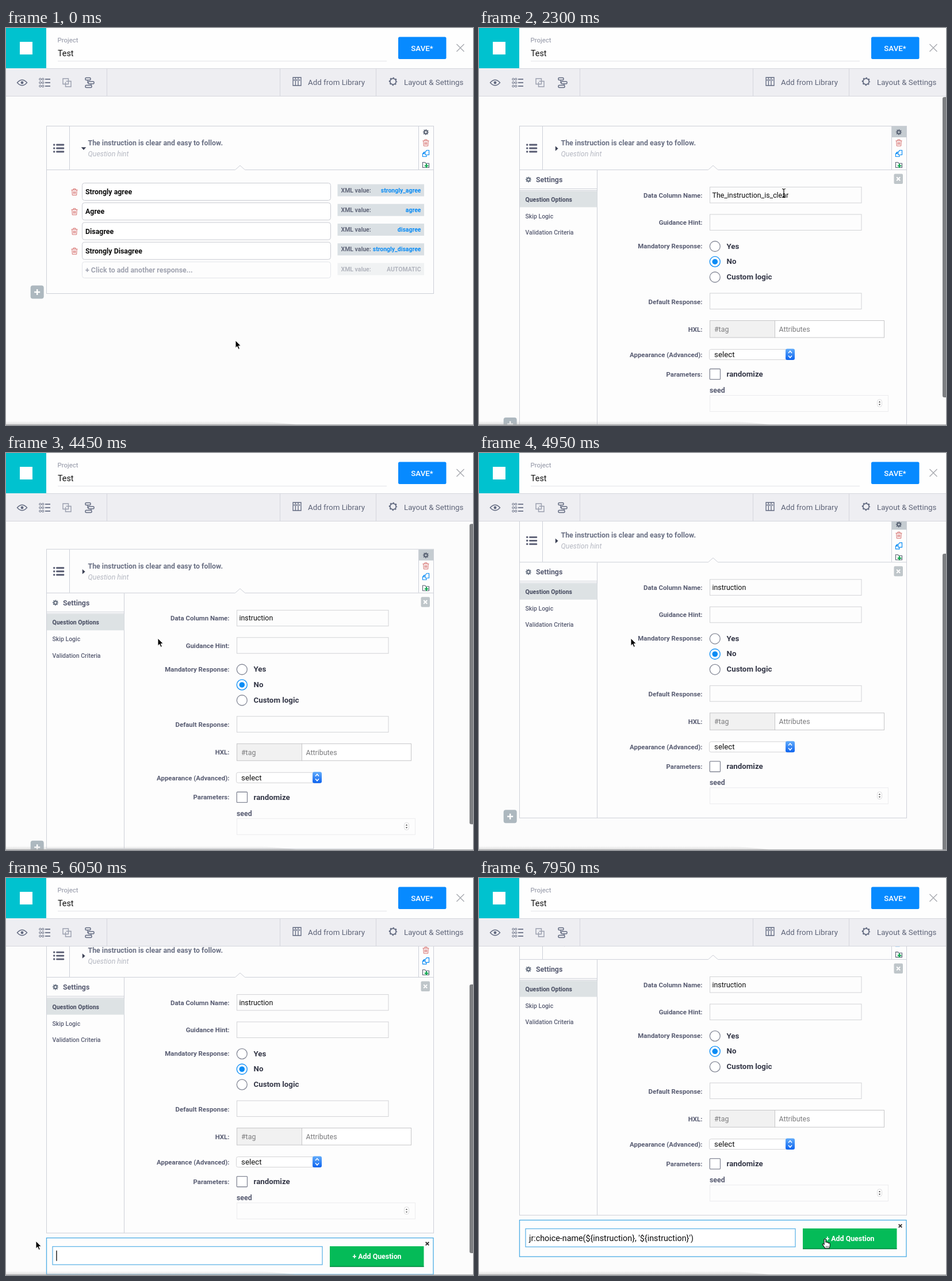
Write an HTML page that moves like this. It is 812x690 px and loops after 8000 ms.

```html
<!DOCTYPE html>
<html lang="en">
<head>
<meta charset="utf-8">
<title>Form builder</title>
<style>
html, body { margin: 0; width: 100%; height: 100%; overflow: hidden; background: #fcfcfc; }
svg { display: block; width: 100%; height: 100%; font-family: Roboto, sans-serif; }
text { white-space: pre; }
</style>
</head>
<body>
<svg id="stage" viewBox="0 0 812 690"></svg>
<script>
const LOOP = 8000;
const INK = '#585c72', LINE = '#cdd0d8', BLUE = '#0a8cf5', RED = '#d6706e';
const F = { xs: 10.48, s: 11.44, m: 12.39, l: 13.34, xl: 14.3 };

// Markup helpers
const text = (x, y, str, size, fill = INK, weight = 400, extra = '') =>
  `<text x="${x}" y="${y}" font-size="${size}" fill="${fill}" font-weight="${weight}" ${extra}>${str}</text>`;
const box = (x, y, w, h, fill, stroke = 'none', rx = 0, extra = '') =>
  `<rect x="${x}" y="${y}" width="${w}" height="${h}" fill="${fill}" stroke="${stroke}" rx="${rx}" ${extra}/>`;
const path = (d, stroke, width = 1, fill = 'none', extra = '') =>
  `<path d="${d}" stroke="${stroke}" stroke-width="${width}" fill="${fill}" ${extra}/>`;
const ring = (x, y, r, stroke, width = 1, fill = 'none', extra = '') =>
  `<circle cx="${x}" cy="${y}" r="${r}" stroke="${stroke}" stroke-width="${width}" fill="${fill}" ${extra}/>`;
const at = (x, y, body, extra = '') => `<g transform="translate(${x} ${y})" ${extra}>${body}</g>`;
const group = (id, body, extra = '') => `<g id="${id}" ${extra}>${body}</g>`;
const END = 'text-anchor="end"', MID = 'text-anchor="middle"';

// Icons, centred on their own origin
const gear = (r, color, width) => {
  const R = r + width * .75, tooth = R * Math.PI / 8;
  return ring(0, 0, r, color, width) +
    ring(0, 0, R, color, width * .9, 'none', `stroke-dasharray="${tooth}" stroke-dashoffset="${tooth / 2}"`);
};
const trash = path('M-5.5 -3.5H5.5M-2 -3.5V-5.5H2V-3.5M-4.2 -3.5L-3.7 5.5H3.7L4.2 -3.5M-1.7 -1.2V3.4M0 -1.2V3.4M1.7 -1.2V3.4', RED, 1);
const copy = path('M-1 -2.5L1.5 -5.5H5.5V2.5H-1ZM-2 -2.5H-3L-5.5 .5V5.5H1V3.2M-5 .5H-2.8V-2', BLUE, 1.2);
const folder = path('M-5.5 4.5V-4.5H-1.5L0 -2.8H5.5V4.5Z', '#596273', 1.1) + path('M1 -2V5M-2.2 1.5H4.4', '#12a651', 2.2);
const cross = (r, color, width) => path(`M${-r} ${-r}L${r} ${r}M${r} ${-r}L${-r} ${r}`, color, width);
const plus = box(-11.5, -11.5, 23, 23, '#adb8bf', 'none', 4) + path('M-5 0H5M0 -5V5', '#fff', 2.4);
const bullets = [-6, 0, 6].map(y =>
  ring(-7.8, y, 1.7, 'none', 0, INK) + box(-4.3, y - 1.4, 14, 2.8, INK, 'none', 1)).join('');

function header() {
  const icon = '#626a80';
  const eye = path('M-8.5 0Q0 -9.5 8.5 0Q0 9.5 -8.5 0Z', icon, 1.4) + ring(0, 0, 2.4, 'none', 0, icon);
  const dots = [-6, 0, 6].map(y => ring(-7.5, y, 1.7, icon, 1) + ring(-2.8, y, 1.7, icon, 1) +
    path(`M1 ${y}H10`, icon, 1.7)).join('');
  const squares = path('M-7 -7H2.5V2.5H-7ZM-1.5 -2.5H7V7H-2.5V-1', '#9a9fae', 1.4);
  const tree = [[-8, -8.5, 9], [-3, -2, 10], [-8, 4.5, 11]].map(([x, y, w]) => box(x, y, w, 4, 'none', icon, 1.5, 'stroke-width="1.5"')).join('') +
    path('M-4 -4.5V0H-3M2 2V4.5', icon, 1.3);
  const books = path('M-7 -7H-2.6V7H-7ZM-2.6 -7H2V7H-2.6ZM2 -7H7V7H2ZM-5 -4V-1M-.5 -4V-1M4.5 -4V-1', icon, 1.3);
  return box(0, 0, 812, 70, '#fefefe') + box(0, 0, 70, 70, '#00c2cf') +
    box(24, 24, 22, 22, '#fff') +
    text(89.5, 24.5, 'Project', F.s, '#8e92a2') + text(90, 49, 'Test', F.xl, '#111') +
    path('M90 57.5H662', '#e3e4e8') +
    box(682, 15.5, 83.5, 38.5, '#078aff', 'none', 2.5) +
    text(723.5, 39.5, 'SAVE*', F.l, '#fff', 500, MID) + at(790, 34.5, cross(6.5, '#a8aab0', 1.4)) +
    box(0, 70, 812, 49, '#eeeef2') +
    path('M70 70.5H812M0 118.5H812M175.5 71V118M476.5 71V118M643.5 71V118', '#d5d6dd') +
    at(28, 95, eye) + at(67, 95, dots) + at(106, 95, squares) + at(146, 95, tree) + at(506, 93, books) +
    text(525, 99, 'Add from Library', F.l, '#5f6579') +
    at(673, 93, gear(5.2, icon, 1.7)) + text(692, 99, 'Layout &amp; Settings', F.l, '#5f6579');
}

function answers() {
  const rows = [['Strongly agree', 'strongly_agree'], ['Agree', 'agree'],
    ['Disagree', 'disagree'], ['Strongly Disagree', 'strongly_disagree']];
  return rows.map(([label, value], i) => at(0, i * 34.25,
    at(119, 285, trash) + box(132.5, 269.5, 432, 30, '#fff', '#c9cbd2', 4) +
    text(138, 289, label, F.m, '#0c0c0c', 700) +
    box(576.5, 271.5, 150.5, 21, '#dae0e4') +
    text(582.5, 285.5, 'XML value:', F.xs, '#62677a', 700) +
    text(721.5, 285.5, value, F.xs, BLUE, 700, END))).join('') +
    box(132.5, 406.5, 432, 28, '#fdfdfd', '#e3e5ea', 4) +
    text(138, 425, '+ Click to add another response...', F.m, '#a0a3b0', 700) +
    box(576.5, 408.5, 150.5, 21, '#f0f2f3') +
    text(582.5, 422.5, 'XML value:', F.xs, '#b2b5be', 700) +
    text(721.5, 422.5, 'AUTOMATIC', F.xs, '#b2b5be', 700, END);
}

function settings() {
  const labels = [['Data Column Name:', 290.5], ['Guidance Hint:', 338], ['Mandatory Response:', 379],
    ['Default Response:', 475.5], ['HXL:', 523.5], ['Appearance (Advanced):', 568], ['Parameters:', 601.5]];
  const radios = [['Yes', 379.5], ['No', 406.2], ['Custom logic', 433]];
  const field = y => box(401.5, y, 263.5, 27.5, '#fdfdfd', '#d2d3d6');
  return path('M205.5 247V691M71 279.5H205M71 282.5H205', LINE) +
    at(86, 263.5, gear(2.7, '#667080', 2)) + text(99, 268, 'Settings', F.m, INK, 700) +
    box(71, 283.5, 134.5, 28, '#dde2e4') +
    text(80.5, 301.5, 'Question Options', F.xs, '#44495e', 700) +
    text(80.5, 330.5, 'Skip Logic', F.xs, INK, 500) + text(80.5, 359, 'Validation Criteria', F.xs, INK, 500) +
    box(721.5, 253.5, 15.5, 17.5, '#bfc6ca', 'none', 2) + at(729.2, 262.3, cross(3, '#fff', 2)) +
    labels.map(([s, y]) => text(388.5, y + 4, s, F.s, INK, 700, END)).join('') +
    field(276.5) + field(324) + field(461) +
    group('focus', box(401, 276, 264.5, 28.5, '#fff', '#6fb5f0', 1, 'stroke-width="2"')) +
    group('selection', box(405.5, 281.5, 133, 18, '#b3d6fd')) +
    text(405.5, 294.7, '', F.m, '#0c0c0c', 400, 'id="column"') +
    group('columnCaret', box(0, 283, 1.3, 15, '#000')) +
    radios.map(([s, y], i) => ring(410.3, y, 9, i == 1 ? BLUE : '#858997', 1.3, '#fff') +
      (i == 1 ? ring(410.3, y, 4.8, 'none', 0, BLUE) : '') + text(430.5, y + 4, s, F.l, '#343747', 700)).join('') +
    box(401.5, 508.5, 113, 29.5, '#f1f1f1', '#c6c6c8') + box(514.5, 508.5, 190, 29.5, '#fff', '#c6c6c8') +
    text(409, 528, '#tag', F.m, '#7c7c7e') + text(521.5, 528, 'Attributes', F.m, '#7c7c7e') +
    box(400.5, 558.5, 147, 18, '#fff', '#d3d3d5', 3) + box(533, 557.5, 16, 19.5, 'url(#cap)', 'none', 3) +
    path('M538 565L541 561.5L544 565M538 569.5L541 573L544 569.5', '#fff', 1.5) +
    text(409, 572, 'select', F.l, '#111') +
    box(401.3, 592.5, 18.2, 18.2, '#fff', '#858997', 1, 'stroke-width="1.3"') +
    text(430.5, 606, 'randomize', F.l, '#343747', 700) + text(401, 634, 'seed', F.m, INK, 700) +
    box(401.5, 638.5, 310, 28, '#fdfdfd', '#ececee') +
    box(692.5, 645.5, 8, 13, '#fff', '#dcdcde', 4) +
    path('M694.8 650.8L696.5 648.6L698.2 650.8ZM694.8 653.6L696.5 655.8L698.2 653.6Z', 'none', 0, '#444');
}

function addRow() {
  return box(70.5, 699.5, 672.5, 63.5, '#fdfdfd', '#4bace5', 0, 'stroke-width="1.3"') +
    box(81, 714.5, 469, 31.5, '#fff', '#62b5e8', 0, 'stroke-width="1.3"') +
    text(87, 735.5, '', F.xl, '#0c0c0c', 400, 'id="newText"') +
    group('newCaret', box(0, 721.5, 1.3, 18, '#000')) +
    box(563, 714, 163.5, 36, '#05bb58') + box(563, 748.5, 163.5, 1.5, '#0a8a45') +
    text(645, 736, '+ Add Question', F.m, '#fff', 700, MID) +
    at(732.5, 709.5, cross(2.8, '#333', 1.9));
}

function card() {
  return `<rect id="frame" x="70.5" y="170.5" width="673" fill="#fdfdfd" stroke="${LINE}"/>` +
    path('M71 246.5H398.5L407 239L415.5 246.5H743M110.5 171V246M717.5 171V246', LINE) +
    text(142.5, 204, 'The instruction is clear and easy to follow.', F.m, '#6a7084', 700) +
    text(142.5, 223, 'Question hint', F.m, '#b5b8c2', 400, 'font-style="italic"') +
    group('gearBack', box(718, 171, 25, 19, '#c5ccd1')) +
    group('overlay', box(71, 171, 672, 76, '#9bafb1', 'none', 0, 'opacity=".93"') +
      path('M110.5 171V246', '#8fa0a5') +
      text(406.7, 214, 'Settings', 21.85, '#565b78', 700, MID)) +
    group('icons', at(91.5, 209, bullets) +
      path('M130.7 207.3H139.3L135 212Z', 'none', 0, '#3c4155', 'id="open"') +
      path('M132.8 205.2V213.8L137.6 209.5Z', 'none', 0, '#3c4155', 'id="closed"') +
      at(730, 181, gear(2.7, '#596273', 2)) + at(730, 199.5, trash) +
      at(730, 218, copy) + at(730, 238, folder)) +
    group('answers', answers()) + group('settings', settings()) +
    `<g id="plus">${plus}</g>` + group('addRow', addRow());
}

const hand = 'M-1.4 1.2C-1.4 -.4 1.4 -.4 1.4 1.2V6C1.7 4.7 4 5 4 6.4C4.5 5.4 6.5 5.8 6.5 7.2C7.1 6.4 8.8 6.8 8.8 8.2V11.2C8.8 13.2 7.6 14.2 7.6 16.2H.2C-.1 14.2 -3.2 11.6 -4.2 9.6C-4.8 8.2 -3.2 7.4 -1.4 9.4Z';
const cursors = group('arrow', path('M0 0V13.2L3 10.4L5.1 15.4L7.4 14.4L5.3 9.6H9.4Z', '#fff', 1, '#000')) +
  group('hand', path(hand, '#111', 1.1, '#fff') + path('M2 12V15M4 12V15M6 12V15', '#333', .8)) +
  group('beam', path('M-3 -7.5Q0 -7.5 0 -5.5Q0 -7.5 3 -7.5M0 -5.5V5.5M-3 7.5Q0 7.5 0 5.5Q0 7.5 3 7.5M-1.5 1H1.5', '#111', 1.2));

document.getElementById('stage').innerHTML =
  `<defs><clipPath id="view">${box(0, 119, 812, 571, '#000')}</clipPath>
  <linearGradient id="cap" x2="0" y2="1"><stop stop-color="#62acfb"/><stop offset="1" stop-color="#0d63ef"/></linearGradient>
  <linearGradient id="fade" x2="0" y2="1"><stop stop-color="#bbb" stop-opacity="0"/><stop offset="1" stop-color="#aaa" stop-opacity=".45"/></linearGradient></defs>` +
  box(0, 0, 812, 690, '#fcfcfc') +
  `<g clip-path="url(#view)">${group('page', card())}</g>` + header() +
  '<rect id="bar" x="806" width="9" rx="3" fill="#7d7f82"/>' +
  path('M0 683H440L515 690H0Z', 'none', 0, 'url(#fade)') + path('M0 689.5H812', '#a5a6a8') +
  group('cursor', cursors);

const $ = Object.fromEntries([...document.querySelectorAll('#stage [id]')].map(e => [e.id, e]));
const show = (e, on) => e.setAttribute('visibility', on ? 'inherit' : 'hidden');
const move = (e, x, y) => e.setAttribute('transform', `translate(${x} ${y})`);
const ramp = (t, a, b) => Math.min(1, Math.max(0, (t - a) / (b - a)));
const ease = (t, a, b) => { const p = ramp(t, a, b); return p * p * (3 - 2 * p); };
const between = (t, a, b) => t >= a && t < b;
const setText = (e, s) => { if (e.textContent !== s) e.textContent = s; };

// start, end, x, y of each pointer move
const moves = [[200, 1050, 721.5, 189.5], [1700, 2250, 530, 287], [3800, 4200, 264, 322],
  [5050, 5550, 52, 631], [7250, 7850, 601.5, 627.5]];
const FORMULA = "jr:choice-name(${instruction}, '${instruction}')";

const T = { hover: 930, open: 1400, leave: 1750, focus: 2400, select: 2550, type: 2800,
  blur: 4250, add: 5950, paste: 7200 };

function draw(t) {
  const opened = t >= T.open, adding = t >= T.add;
  const scroll = 56.7 * ease(t, 4400, 4750) + 48.2 * ease(t, T.add, 6200);
  move($.page, 0, -scroll);

  const bottom = opened ? 691 : 461.5;
  $.frame.setAttribute('height', bottom - 170.5);
  move($.plus, 54.2, bottom - 2.5);
  show($.plus, !adding);
  show($.addRow, adding);
  show($.answers, !opened);
  show($.settings, opened);
  show($.open, !opened);
  show($.closed, opened);
  show($.gearBack, opened);

  const hover = ramp(t, T.hover, T.hover + 120) * (1 - ramp(t, T.leave, T.leave + 100));
  $.overlay.setAttribute('opacity', hover);
  $.icons.setAttribute('opacity', 1 - .25 * hover);

  // Column name: select all, then type over it
  const count = Math.floor((t - T.type) / 75) + 1;
  setText($.column, t < T.type ? 'The_instruction_is_clear' : 'instruction'.slice(0, count));
  show($.focus, between(t, T.focus, T.blur));
  show($.selection, between(t, T.select, T.type));
  const typed = T.type + 750;
  show($.columnCaret, between(t, T.type, T.blur) && (t < typed || (t - typed) % 1000 < 500));
  if (opened) move($.columnCaret, 405.5 + $.column.getComputedTextLength(), 0);

  setText($.newText, t < T.paste ? '' : FORMULA);
  const since = t - (t < T.paste ? T.add : T.paste);
  show($.newCaret, adding && since % 1000 < 500);
  if (adding) move($.newCaret, 87.3 + (t < T.paste ? 0 : $.newText.getComputedTextLength()), 0);

  const alpha = Math.max(
    ramp(t, T.open, T.open + 50) * (1 - ramp(t, 2400, 2550)),
    ramp(t, 4400, 4450) * (1 - ramp(t, 5000, 5120)),
    ramp(t, T.add, T.add + 50) * (1 - ramp(t, 6800, 6950)));
  $.bar.setAttribute('opacity', alpha);
  $.bar.setAttribute('y', 120 + scroll * (adding ? .88 : .97));
  $.bar.setAttribute('height', adding ? 467 : 522);

  let x = 399, y = 543;
  for (const [a, b, nx, ny] of moves) {
    const p = ease(t, a, b);
    x += (nx - x) * p;
    y += (ny - y) * p;
  }
  move($.cursor, x, y);
  const beam = between(t, 2130, 3900);
  const point = between(t, 960, 1780) || between(t, 5470, T.add) || t >= 7780;
  const hidden = between(t, T.type, 3800) || between(t, 6500, 7250);
  show($.cursor, !hidden);
  show($.beam, beam && !hidden);
  show($.hand, point && !hidden);
  show($.arrow, !beam && !point && !hidden);
}

const began = performance.now();
function tick() {
  draw((performance.now() - began) % LOOP);
  requestAnimationFrame(tick);
}
tick();
</script>
</body>
</html>
```
